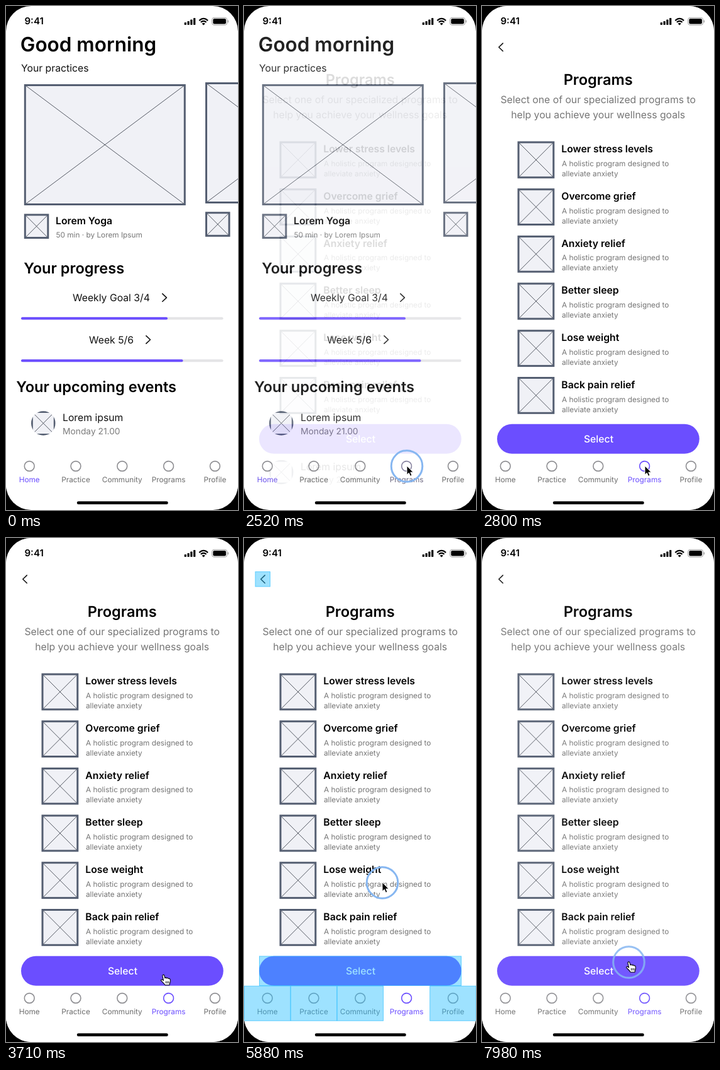
Write an HTML page that moves like this. It is 369 px wide and 799 px high and loops after 8 s.

```html
<!DOCTYPE html>
<html lang="en">
<head>
<meta charset="utf-8">
<title>Wellness app prototype</title>
<style>
html, body { margin: 0; width: 100%; height: 100%; overflow: hidden; background: #000; }
svg { display: block; width: 100%; height: 100%; }
text { font-family: Inter, "Liberation Sans", sans-serif; font-size: 15.75px; fill: #000;
  font-optical-sizing: none; text-rendering: geometricPrecision; white-space: pre; }
.h1 { font-size: 31.5px; font-weight: 600; }
.h2 { font-size: 23.6px; font-weight: 600; }
.h3 { font-weight: 600; }
.body { fill: #111; }
.lead { fill: #757575; }
.note { font-size: 11.8px; fill: #757575; }
.date { font-size: 13.8px; fill: #7c7c7c; }
.tab { font-size: 11.8px; fill: #6d6d6d; }
.on { fill: #6b4eff; }
.mid { text-anchor: middle; }
</style>
</head>
<body>
<svg id="stage" viewBox="0 0 369 799"></svg>
<script>
const LOOP = 8000, VIOLET = '#6b4eff', SLATE = '#545e71', HINT = '#28beff';

const text = (x, y, cls, s) => `<text x="${x}" y="${y}" class="${cls}">${s}</text>`;

const rect = (x, y, w, h, fill, more = '') =>
  `<rect x="${x}" y="${y}" width="${w}" height="${h}" fill="${fill}" ${more}/>`;

const path = (d, stroke, width, more = '') =>
  `<path d="${d}" fill="none" stroke="${stroke}" stroke-width="${width}" ${more}/>`;

// Placeholder picture: framed box with both diagonals
const picture = (x, y, w, h) =>
  rect(x, y, w, h, '#f0f1f6') +
  path(`M${x} ${y}l${w} ${h}M${x + w} ${y}l${-w} ${h}`, '#555a64', 1) +
  rect(x, y, w, h, 'none', `stroke="${SLATE}" stroke-width="3"`);

const chevron = (x, y, dx) =>
  path(`M${x} ${y - 6.2}l${dx} 6.2l${-dx} 6.2`, '#111', 1.6,
    'stroke-linecap="round" stroke-linejoin="round"');

const progress = (y, end) =>
  path(`M26 ${y}H343.5`, '#e4e4e6', 4, 'stroke-linecap="round"') +
  path(`M26 ${y}H${end}`, VIOLET, 4, 'stroke-linecap="round"');

const event = y =>
  `<g clip-path="url(#disc)" transform="translate(59.3 ${y})">${picture(-18, -18, 36, 36)}</g>` +
  text(90, y - 3.4, 'body', 'Lorem ipsum') +
  text(90, y + 17, 'date', 'Monday 21.00');

const TABS = ['Home', 'Practice', 'Community', 'Programs', 'Profile'];
const tabX = i => 37.2 + i * 73.8;

const nav = (active, ringOn) =>
  rect(0, 710, 369, 56, '#fff') +
  TABS.map((name, i) => {
    const on = i === active;
    return `<circle cx="${tabX(i)}" cy="729.5" r="7.9" fill="none" stroke-width="1.6"
      stroke="${on && ringOn ? VIOLET : '#8e8e92'}"/>` +
      text(tabX(i), 755, 'tab mid' + (on ? ' on' : ''), name);
  }).join('');

const home =
  text(22.8, 72, 'h1', 'Good morning') +
  text(24, 103.6, 'body', 'Your practices') +
  picture(30.3, 125.5, 254, 189) +
  picture(318.5, 122.5, 254, 189) +
  picture(30.3, 331, 36.5, 36.5) +
  picture(318.5, 327.8, 36.5, 36.5) +
  text(79, 345.5, 'h3', 'Lorem Yoga') +
  text(79.5, 367, 'note', '50 min · by Lorem Ipsum') +
  text(28.2, 423.5, 'h2', 'Your progress') +
  text(106, 468, 'body', 'Weekly Goal 3/4') + chevron(248.8, 462.3, 6.6) + progress(495.3, 255) +
  text(132, 535, 'body', 'Week 5/6') + chevron(222.9, 529, 6.6) + progress(562.3, 279.5) +
  text(16.2, 612.3, 'h2', 'Your upcoming events') +
  event(661.5) + nav(0, false);

const GOALS = ['Lower stress levels', 'Overcome grief', 'Anxiety relief',
  'Better sleep', 'Lose weight', 'Back pain relief'];

const programs =
  rect(0, 0, 369, 799, '#fff') +
  chevron(33.2, 65.3, -6.4) +
  text(184.7, 125.3, 'h2 mid', 'Programs') +
  text(184.7, 153.7, 'lead mid', 'Select one of our specialized programs to') +
  text(184.7, 177.5, 'lead mid', 'help you achieve your wellness goals') +
  GOALS.map((name, i) => {
    const y = 216 + i * 74.7;
    return picture(58, y, 55.8, 55.8) +
      text(126.3, y + 16.3, 'h3', name) +
      text(127, y + 38, 'note', 'A holistic program designed to') +
      text(127, y + 54, 'note', 'alleviate anxiety');
  }).join('') +
  rect(24, 662.8, 321.7, 47, VIOLET, 'rx="23.5"') +
  `<text x="185.5" y="692" class="mid" style="fill:#fff;font-weight:500">Select</text>` +
  nav(3, true);

const hints = [[18, 53.5, 23.5, 23.5], [24.5, 663, 321, 46.5],
  ...[0, 1, 2, 4].map(i => [i * 73.8 + .5, 710.3, 73.4, 55])]
  .map(([x, y, w, h]) => rect(x, y, w, h, HINT,
    `fill-opacity=".45" stroke="${HINT}" stroke-opacity=".65"`)).join('');

const statusBar =
  `<text x="29.5" y="29.3" style="font-size:15px;font-weight:600">9:41</text>` +
  [4, 6, 8.5, 11].map((h, i) => rect(283.7 + i * 4.8, 30 - h, 3.2, h, '#000', 'rx=".8"')).join('') +
  path('M307.3 23.1Q314.2 16.8 321.1 23.1M309.8 25.8Q314.2 21.8 318.6 25.8', '#000', 2.1) +
  '<path d="M311.7 27.9Q314.2 25.7 316.7 27.9L314.2 30.6Z"/>' +
  rect(327.6, 18.4, 24, 11.8, 'none', 'rx="3.4" stroke="#a0a0a0"') +
  rect(329.3, 20.1, 20.6, 8.4, '#000', 'rx="2"') +
  path('M353.4 22.4v3.8', '#a0a0a0', 1.4);

const arrow = `<path d="M0 0V14.2L3.3 11.2L5.5 16.3L8 15.2L5.8 10.2H10.2Z"
  fill="#000" stroke="#fff" stroke-width="1" stroke-linejoin="round"/>`;

const hand = `<path d="M-1.6 1.4C-1.4 -.6 1 -.7 1.4 1.2L2.4 5.2C3 4 4.8 4 5.2 5.4
  C6 4.4 7.6 4.8 8 6.1C9 5.4 10.4 6 10.7 7.4C11.2 9.6 11 11.6 10 13.3L9.6 16.2H2.6
  C1.4 13.8 -.8 12.2 -3.4 9.6C-4.6 8.2 -3 6.8 -1.6 7.8L.1 9Z"
  fill="#fff" stroke="#000" stroke-width="1.1" stroke-linejoin="round"/>
  <path d="M4 10v3.6M6.2 10v3.6M8.3 10v3.6" stroke="#000" stroke-width=".9"/>`;

const layer = (id, content) => `<g id="${id}">${content}</g>`;

const stage = document.getElementById('stage');
stage.innerHTML =
  `<defs><clipPath id="disc"><circle r="19.3"/></clipPath>
  <clipPath id="screen"><rect width="369" height="799" rx="40"/></clipPath></defs>` +
  rect(0, 0, 369, 799, '#000') +
  `<g clip-path="url(#screen)">` +
  rect(0, 0, 369, 799, '#fff') +
  layer('home', home) + layer('programs', programs) + layer('ghost', event(739)) +
  layer('hints', hints) + layer('veil', rect(0, 0, 369, 799, '#fff')) +
  statusBar + rect(112.8, 785.3, 145, 4.8, '#000', 'rx="2.4"') +
  layer('ring', `<circle r="24.8" fill="none" stroke="#87b7f1" stroke-width="3"/>`) +
  layer('arrow', arrow) + layer('hand', hand) + '</g>';

const el = {};
for (const g of stage.querySelectorAll('g[id]')) el[g.id] = g;

const ramp = (t, a, b) => Math.min(1, Math.max(0, (t - a) / (b - a)));
const smooth = u => u * u * (3 - 2 * u);
const easeOut = u => 1 - (1 - u) ** 1.8;
const show = (name, opacity) => {
  el[name].style.display = opacity > 0 ? '' : 'none';
  el[name].setAttribute('opacity', opacity);
};
const move = (name, x, y) => el[name].setAttribute('transform', `translate(${x} ${y})`);

// Pointer moves: start, end, then destination
const MOVES = [
  [910, 1540, 259, 729], [3200, 3990, 247, 678],
  [4410, 5320, 220, 546], [6090, 6580, 233.5, 672]
];

function pointer(t) {
  let x = 200, y = 806;
  for (const [a, b, toX, toY] of MOVES) {
    const k = smooth(ramp(t, a, b));
    x += (toX - x) * k;
    y += (toY - y) * k;
  }
  return [x, y];
}

const press = (t, down, up) => ramp(t, down, down + 70) * (1 - ramp(t, up, up + 150));

function draw(t) {
  const [x, y] = pointer(t);
  const fade = easeOut(ramp(t, 2498, 2790));
  show('home', fade < 1 ? 1 : 0);
  show('programs', fade);
  show('ghost', fade < 1 ? Math.min(fade, 1 - fade) * .7 : 0);
  show('hints', ramp(t, 5740, 5840) * (1 - ramp(t, 5960, 6670)));
  show('veil', ramp(t, 7900, 8000) * .07);

  const onButton = (t > 3700 && t < 4760) || t > 6500;
  show('arrow', t >= 910 && !onButton ? 1 : 0);
  show('hand', onButton ? 1 : 0);
  show('ring', Math.max(press(t, 2380, 2540), press(t, 5740, 5920), press(t, 7910, 8100) * .85));
  move('arrow', x, y);
  move('hand', x, y);
  move('ring', x, y + .5);
}

function frame() {
  draw(performance.now() % LOOP);
  requestAnimationFrame(frame);
}
frame();
</script>
</body>
</html>
```
